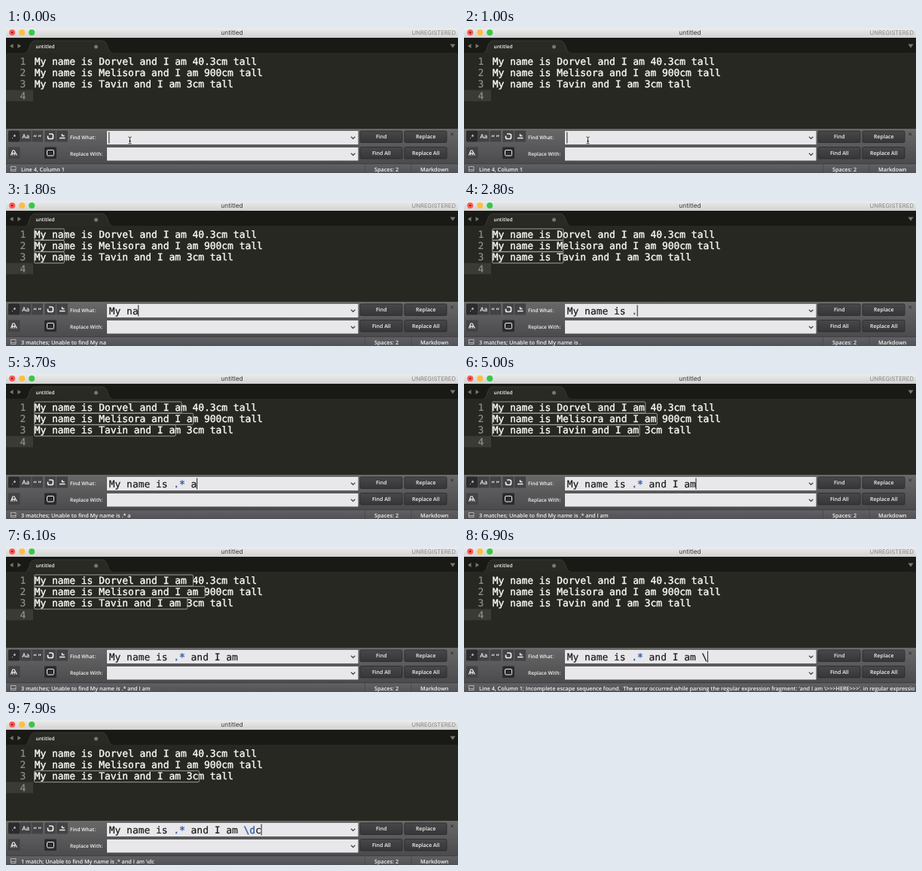
Write an HTML page that moves like this. It is 600 px wide and 193 px high and loops after 8000 ms.

```html
<!DOCTYPE html>
<html lang="en">
<head>
<meta charset="utf-8">
<title>Regex search</title>
<style>
  html, body { margin: 0; width: 100%; height: 100%; overflow: hidden; background: #272822; }
  svg { display: block; width: 600px; height: 193px; }
  text { white-space: pre; text-rendering: geometricPrecision; font: 600 7.28px "Open Sans", sans-serif; fill: #f4f4f4; }
  .code text, #query { font: 12.92px "DejaVu Sans Mono", monospace; stroke-width: .4; }
  .code text { fill: #f8f8f2; stroke: #f8f8f2; }
  .code .num { fill: #8f908a; stroke: #8f908a; stroke-width: .2; }
  #query { fill: #1a1a1a; stroke: #1a1a1a; stroke-width: .2; }
  #query .op { fill: #3f66ae; stroke: #3f66ae; stroke-width: .5; }
  .title { font: 8.4px Inter, sans-serif; fill: #3c3c3c; text-anchor: middle; }
  .note { font: 7.7px Inter, sans-serif; fill: #858585; text-anchor: end; }
  .small { font-size: 6.6px; }
  .btn text { font-size: 7px; text-anchor: middle; }
  .btn rect { fill: url(#key); stroke: #29292b; stroke-width: .8; }
  .icon { fill: none; stroke: #eee; stroke-width: 1.2; }
  #marks rect { fill: none; stroke: #a9aaa2; stroke-width: .9; }
</style>
</head>
<body>
<svg viewBox="0 0 600 193">
  <defs>
    <linearGradient id="bar" x2="0" y2="1"><stop stop-color="#ececec"/><stop offset="1" stop-color="#d2d2d2"/></linearGradient>
    <linearGradient id="panel" x2="0" y2="1"><stop stop-color="#686869"/><stop offset="1" stop-color="#4b4b4d"/></linearGradient>
    <linearGradient id="foot" x2="0" y2="1"><stop stop-color="#626266"/><stop offset="1" stop-color="#525256"/></linearGradient>
    <linearGradient id="key" x2="0" y2="1"><stop stop-color="#48484a"/><stop offset="1" stop-color="#363638"/></linearGradient>
    <clipPath id="footClip"><path d="M0 180H598V193H0z"/></clipPath>
  </defs>

  <rect width="600" height="193" fill="#272822"/>
  <rect width="600" height="13" fill="url(#bar)"/>
  <circle cx="8.200" cy="6" r="4" fill="#fc5b57"/>
  <circle cx="8.200" cy="6" r="1.300" fill="#8c1f1a"/>
  <circle cx="21.200" cy="6" r="4" fill="#fdbe41"/>
  <circle cx="34.200" cy="6" r="4" fill="#34c84a"/>
  <text class="title" x="300" y="9">untitled</text>
  <text class="note" x="597" y="9">UNREGISTERED</text>

  <rect y="13" width="600" height="20" fill="#191a16"/>
  <path d="M25 33.5C32 33 30 17 38 17H128C136 17 134 33 142 33.5z" fill="#292a24" stroke="#3f403a" stroke-width=".8"/>
  <rect y="33" width="600" height="102" fill="#272822"/>
  <path d="M9.500 21V27L5 24zM15.500 21V27L20 24zM589.500 21.500H596.500L593 26.500z" fill="#777872"/>
  <text class="small" x="39.500" y="27.300">untitled</text>
  <circle cx="119.500" cy="25" r="2.500" fill="#777872"/>

  <rect y="82.500" width="36" height="15" fill="#3a3b35"/>
  <g class="code" id="code"></g>
  <g id="marks"></g>

  <rect y="134.500" width="600" height="46" fill="url(#panel)"/>
  <path d="M0 135H600" stroke="#7b7b7c" stroke-width=".8"/>
  <g fill="#2b2b2d">
    <rect x="3" y="136.500" width="15.500" height="15" rx="1.500"/>
    <rect x="51" y="158.500" width="16" height="15.500" rx="1.500"/>
  </g>
  <path d="M19 136.500H33.500V151.500H19zM34.500 136.500H49V151.500H34.500zM51.500 136.500H66V151.500H51.500zM67 136.500H82V151.500H67zM3 158.500H18.500V174H3z" fill="#434345"/>
  <g class="btn">
    <text x="10.500" y="147">.*</text>
    <text x="26.300" y="147.200" style="font-size:8px">Aa</text>
    <text x="41.700" y="149" style="font-size:9px;font-weight:700">“ ”</text>
  </g>
  <g class="icon">
    <path d="M57 141H60.500Q62.500 141 62.500 143V145.500Q62.500 147.500 60.500 147.500H57.500Q55.500 147.500 55.500 145.500V143.500" stroke-width="1.700"/>
    <path d="M71 146.500H78.500M74 143.500H77.500M74.500 141V144" stroke-width="1.400"/>
    <path d="M6.500 169.500L9 163H11L14.500 169.500M9 169.500V166.500H11.500V169.500"/>
    <rect x="54.500" y="162.500" width="9" height="7.500" rx="1.500" stroke-width="1"/>
    <path d="M590.500 139.500L594 143M594 139.500L590.500 143" stroke="#2b2b2b" stroke-width="1"/>
  </g>
  <text class="small" x="85" y="148.200">Find What:</text>
  <text class="small" x="85" y="170.200">Replace With:</text>
  <g fill="#e8e7e9">
    <rect x="134" y="137" width="333.500" height="18"/>
    <rect x="134" y="159" width="333.500" height="17.500"/>
  </g>
  <path d="M458 144.700L460.700 147.300L463.400 144.700M458 166.700L460.700 169.300L463.400 166.700" fill="none" stroke="#444" stroke-width="1.200"/>
  <g class="btn" id="buttons"></g>

  <text id="query" x="136.800" y="150.700"></text>
  <path id="caret" d="M0 138.500V153.500" stroke="#333" stroke-width="1.100"/>
  <path id="mouse" d="M162.500 145Q164.500 145 164.500 146.500V152.500Q164.500 154 162.500 154M166.500 145Q164.500 145 164.500 146.500M164.500 152.500Q164.500 154 166.500 154M163 150.500H166" fill="none" stroke="#222" stroke-width=".9"/>

  <rect y="180.500" width="600" height="12.500" fill="url(#foot)"/>
  <path d="M0 180.800H600" stroke="#39393b" stroke-width=".8"/>
  <path d="M6.500 184.500H13V190.500H6.500zM6.500 188.500H13" fill="none" stroke="#c4c4c6" stroke-width=".8"/>
  <g clip-path="url(#footClip)"><text id="status" x="20" y="190.600"></text></g>
  <g id="mode">
    <path d="M476.500 181V193M538 181V193" stroke="#47474a" stroke-width=".8"/>
    <text x="489" y="190.600">Spaces: 2</text>
    <text x="550" y="190.600">Markdown</text>
  </g>
</svg>
<script>
  const LOOP = 8000, CW = 7.78, ROW = 15.35;
  const lines = [
    'My name is Dorvel and I am 40.3cm tall',
    'My name is Melisora and I am 900cm tall',
    'My name is Tavin and I am 3cm tall',
    ''
  ];
  const typed = 'My name is .* and I am \\dc';
  // time of each key press
  const keys = [1100, 1200, 1400, 1600, 1700, 1900, 2000, 2100, 2300, 2400, 2500, 2700, 2900,
    3300, 3600, 3800, 3900, 4000, 4200, 4300, 4500, 4700, 5400, 6600, 7100, 7600];
  const home = 'Line 4, Column 1';
  const failure = home + '; Incomplete escape sequence found.  The error occurred while parsing ' +
    "the regular expression fragment: 'and I am \\>>>HERE>>>'. in regular expression";

  const $ = id => document.getElementById(id);
  const esc = s => s.replace(/&/g, '&amp;').replace(/</g, '&lt;').replace(/>/g, '&gt;');

  $('code').innerHTML = lines.map((line, i) => {
    const y = 48.6 + i * ROW;
    return `<text class="num" x="18.500" y="${y}">${i + 1}</text><text x="37.700" y="${y}">${line}</text>`;
  }).join('');

  $('buttons').innerHTML = [['Find', 470, 137], ['Replace', 529, 137], ['Find All', 470, 158.5], ['Replace All', 529, 158.5]]
    .map(([label, x, y]) => `<rect x="${x}" y="${y}" width="56" height="15.500" rx="1.500"/>
      <text x="${x + 28.3}" y="${y + 10.2}">${label}</text>`).join('');

  function search(query) {
    if (!query) return { hits: [], message: home };
    let rule;
    try { rule = new RegExp(query); } catch { return { hits: [], message: failure }; }
    const hits = [];
    lines.forEach((line, row) => {
      const m = rule.exec(line);
      if (m) hits.push({ row, from: m.index, size: m[0].length });
    });
    const noun = hits.length === 1 ? 'match' : 'matches';
    return { hits, message: `${hits.length} ${noun}; Unable to find ${query}` };
  }

  let shown = -1;
  function show(count) {
    if (count === shown) return;
    shown = count;
    const query = typed.slice(0, count);
    const { hits, message } = search(query);
    $('query').innerHTML = esc(query).replace(/\.\*?|\\d/g, '<tspan class="op">$&</tspan>');
    $('marks').innerHTML = hits.map(h =>
      `<rect x="${37.5 + h.from * CW}" y="${37 + h.row * ROW}" width="${h.size * CW + 1}" height="15" rx="1.500"/>`).join('');
    $('status').textContent = message;
    $('mode').style.display = message === failure ? 'none' : '';
    $('mouse').style.display = count ? 'none' : '';
    $('caret').setAttribute('transform', `translate(${136.8 + count * CW} 0)`);
  }

  function tick() {
    const t = performance.now() % LOOP;
    const count = keys.filter(k => k <= t).length;
    show(count);
    const idle = t - (count ? keys[count - 1] : 0);
    $('caret').style.opacity = idle % 1000 < 500 ? 1 : 0;
    requestAnimationFrame(tick);
  }
  tick();
</script>
</body>
</html>
```
